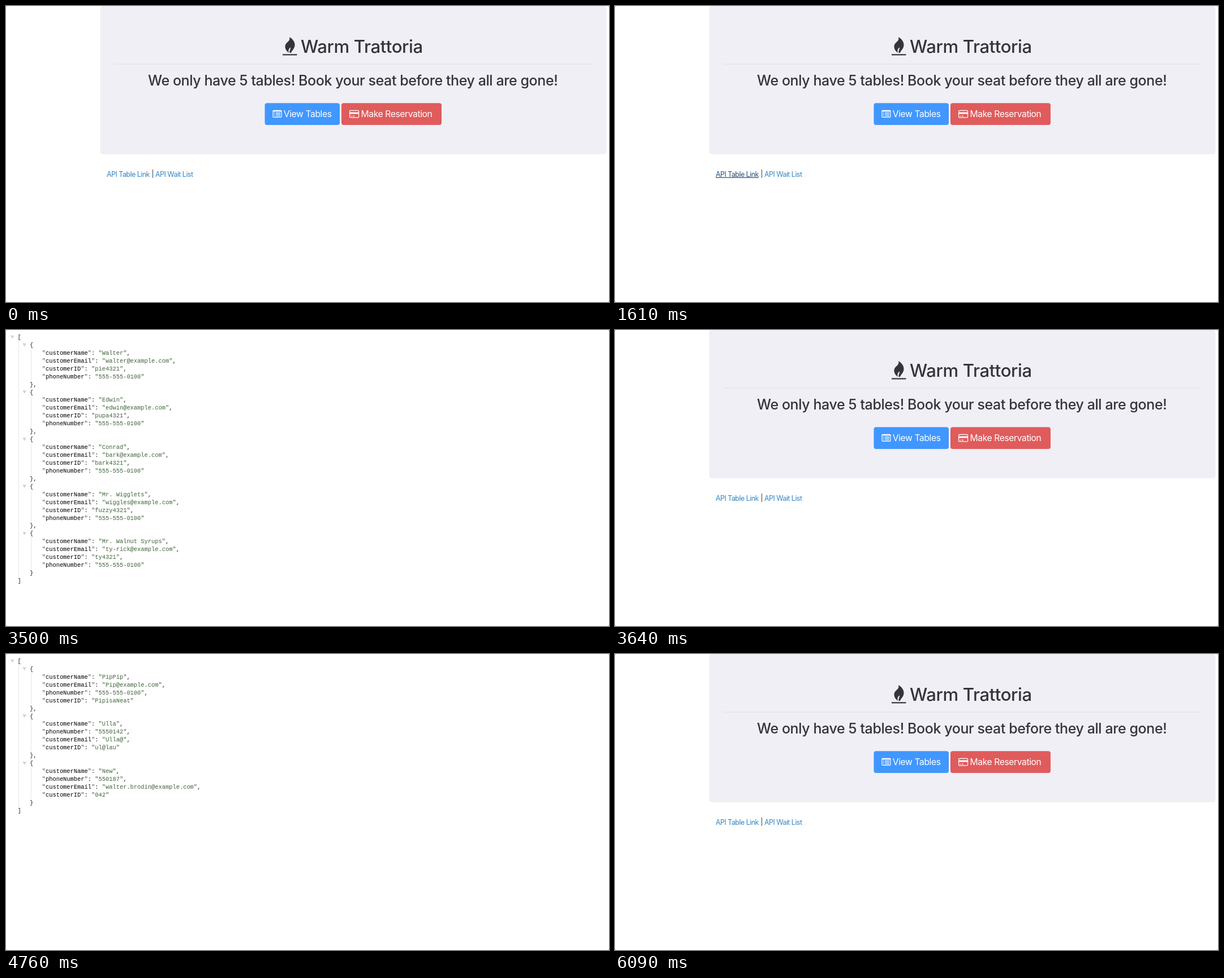
Animation, 1066 px wide and 525 px high, one loop 7 s. Source, as an HTML page:

```html
<!DOCTYPE html>
<html lang="en">
<head>
<meta charset="utf-8">
<title>Table reservations</title>
<style>
  html, body { margin: 0; width: 100%; height: 100%; overflow: hidden; background: #999; }
  svg { display: block; width: 100vw; height: 100vh; background: #fff; border-radius: 2px; }
  text { white-space: pre; }
  #home { font-family: Inter, "Open Sans", sans-serif; font-optical-sizing: none; letter-spacing: -.026em; fill: #35343b; }
  .heading { font-weight: 500; }
  .button { font-size: 15.7px; fill: #fff; }
  .link { font-size: 12.5px; letter-spacing: -.55px; fill: #3786bf; }
  .link.hover { fill: #2b527a; text-decoration: underline; text-decoration-thickness: 1px; }
  .icon { fill: none; stroke: #fff; stroke-width: 1.2; }
  .json { font: 10.4px "Liberation Mono", "Courier New", monospace; fill: #222; }
  .key { fill: #000; }
  .quote { fill: #555; }
  .string { fill: #3f643a; }
  .arrow { fill: #d2d2d2; }
  .guide { stroke: #ccc; stroke-dasharray: 1 1; }
</style>
</head>
<body>
<svg viewBox="0 0 1066 525" preserveAspectRatio="none">
  <g id="home">
    <rect x="166.5" width="895" height="263" rx="4.5" fill="#f0eff5"/>
    <path d="M501 55C507 58.5 511 64 510.5 70C510 76 505.5 78.5 504 83H501.5C500.5 79.5 503.5 77 503 73.5C499 76 499 80 500 83C496 80.5 493 76 493.5 71C494.3 64 503.5 63 501 55Z"/>
    <rect x="489" y="85.3" width="25.5" height="2.2"/>
    <text class="heading" x="521" y="83" font-size="31.2">Warm Trattoria</text>
    <path d="M191.5 103H1036" stroke="#e0dfe5"/>
    <text class="heading" x="613.2" y="141.3" font-size="25" text-anchor="middle">We only have 5 tables! Book your seat before they all are gone!</text>

    <rect x="457.5" y="172.3" width="132.5" height="38.7" rx="4" fill="#4097ff"/>
    <g class="icon">
      <rect x="472" y="185.3" width="15" height="12" rx="1.3"/>
      <path d="M472 186.3H487" stroke-width="2"/>
      <path d="M474 189.6H475.5M477 189.6H485M474 192.2H475.5M477 192.2H485M474 194.8H475.5M477 194.8H485"/>
    </g>
    <text class="button" x="490.8" y="197.4">View Tables</text>

    <rect x="593" y="172.3" width="177" height="38.7" rx="4" fill="#e05b5c"/>
    <g class="icon">
      <rect x="607.6" y="185.3" width="16" height="12.6" rx="1.3"/>
      <path d="M607.6 190H623.6" stroke-width="3"/>
      <path d="M609.8 195.3H611.5M613 195.3H616"/>
    </g>
    <text class="button" x="627.5" y="197.4">Make Reservation</text>

    <text class="link" id="tableLink" x="178" y="302.7">API Table Link</text>
    <text x="257.6" y="302.2" font-size="12.5">|</text>
    <text class="link" id="waitLink" x="264" y="302.7">API Wait List</text>
  </g>
  <g id="tables" class="json"></g>
  <g id="waitlist" class="json"></g>
</svg>
<script>
const LOOP = 7000, LINE = 13.935;
const byId = id => document.getElementById(id);

const booking = (name, mailbox, id) => ({
  customerName: name,
  customerEmail: mailbox + '@example.com',
  customerID: id,
  phoneNumber: '555-555-0100'
});

const tables = [
  booking('Walter', 'walter', 'pie4321'),
  booking('Edwin', 'edwin', 'pupa4321'),
  booking('Conrad', 'bark', 'bark4321'),
  booking('Mr. Wigglets', 'wiggles', 'fuzzy4321'),
  booking('Mr. Walnut Syrups', 'ty-rick', 'ty4321')
];

const waitlist = [
  { customerName: 'PipPip', customerEmail: 'Pip@example.com', phoneNumber: '555-555-0100', customerID: 'PipisaNeat' },
  { customerName: 'Ulla', phoneNumber: '5550142', customerEmail: 'Ulla@', customerID: 'ul@lau' },
  { customerName: 'New', phoneNumber: '550187', customerEmail: 'walter.brodin@example.com', customerID: '042' }
];

// Lays records out as a collapsible JSON tree
function jsonTree(records) {
  let row = 0, svg = '';
  const rowY = n => 12.8 + n * LINE;
  const write = (depth, content) => {
    svg += `<text x="${20.5 + depth * 21.6}" y="${rowY(row++) + 3.2}">${content}</text>`;
  };
  const open = (depth, bracket) => {
    const x = 8 + depth * 21.3, y = rowY(row) - 3;
    svg += `<path class="arrow" d="M${x} ${y}h6.6l-3.3 5.8z"/>`;
    write(depth, bracket);
  };
  const guide = (depth, from, to) => {
    svg += `<path class="guide" d="M${22.5 + depth * 22} ${rowY(from) + 7}V${rowY(to) - 7}"/>`;
  };
  const quote = '<tspan class="quote">"</tspan>';

  open(0, '[');
  records.forEach((record, i) => {
    const start = row, fields = Object.entries(record);
    open(1, '{');
    fields.forEach(([key, value], j) => write(2,
      `${quote}<tspan class="key">${key}</tspan>${quote}: <tspan class="string">"${value}"</tspan>${j < fields.length - 1 ? ',' : ''}`));
    guide(1, start, row);
    write(1, i < records.length - 1 ? '},' : '}');
  });
  guide(0, 0, row);
  write(0, ']');
  return svg;
}

byId('tables').innerHTML = jsonTree(tables);
byId('waitlist').innerHTML = jsonTree(waitlist);

function render(now) {
  const t = now % LOOP;
  const within = (from, to) => t >= from && t < to;
  const page = within(1680, 3640) ? 'tables' : within(4760, 5950) ? 'waitlist' : 'home';
  for (const id of ['home', 'tables', 'waitlist']) byId(id).style.display = id === page ? '' : 'none';
  byId('tableLink').classList.toggle('hover', within(1120, 1680));
  byId('waitLink').classList.toggle('hover', within(4480, 4760));
}

const start = performance.now();
function frame() {
  render(performance.now() - start);
  requestAnimationFrame(frame);
}
frame();
</script>
</body>
</html>
```
